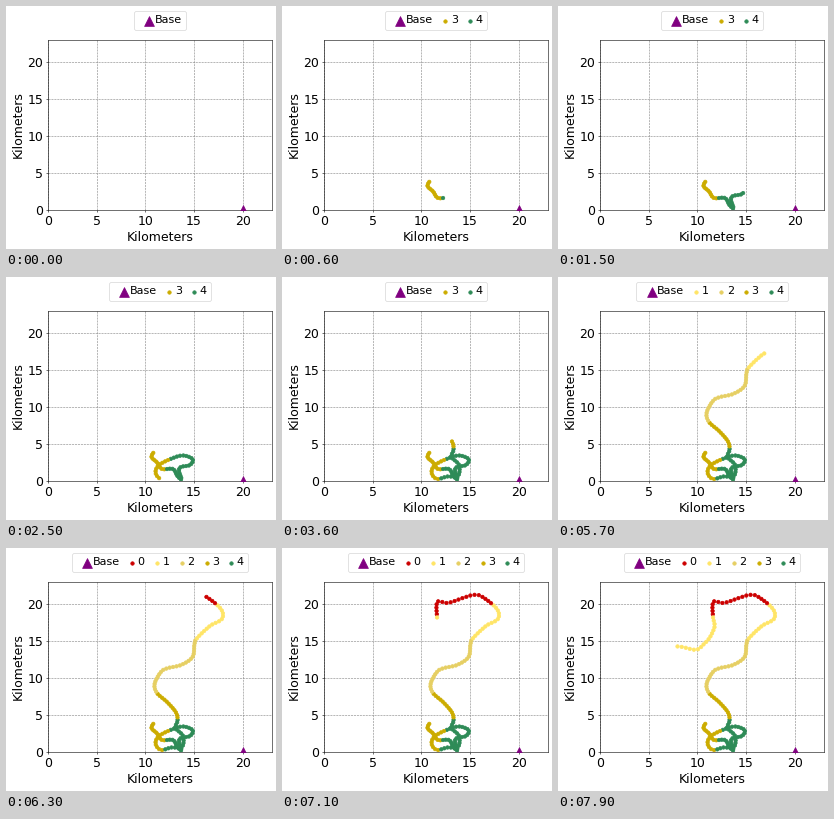
These frames come from a looping animation (270 px wide and 243 px high, 8 s). A matplotlib script:

```python
import matplotlib.pyplot as plt
import numpy as np
from matplotlib.animation import FuncAnimation
from matplotlib.colors import to_rgba_array

W, H, DPI = 270, 243, 50
FRAMES, INTERVAL = 80, 100
DOTS = 2  # new dots per step
BASE = (20, 0)
ZONE = 4  # ring width in km around the base
COLORS = ["#cc0000", "#ffe566", "#e6cf63", "#ccac00", "seagreen"]

# Route legs as knots in km; speed is constant within a leg
START = (10.93, 4.05)
LEGS = [
    [(10.63, 3.24), (11.2, 2.5), (11.7, 1.62), (12.83, 1.62), (13.29, .67)],
    [(13.72, .2), (13.45, 1.35), (13.65, 1.89), (14.58, 2.16), (14.85, 2.95), (13.9, 3.44)],
    [(12.83, 3.1), (11.4, 2.16), (11.05, 1.1), (11.6, .27), (12.68, .61)],
    [(13.75, .65), (13.86, 2.16), (13.09, 3.24), (13.3, 4.2), (13.14, 5.33)],
    [(12.22, 6.75), (11.19, 7.96), (10.95, 9.2), (11.6, 10.8)],
    [(12.3, 11.32), (13.66, 11.74), (14.84, 12.82), (15.04, 14.57), (15.3, 15.35)],
    [(16.63, 17), (17.86, 17.95), (17.75, 19.3), (16.27, 20.92)],
    [(15.4, 21.2), (14.27, 20.78), (12.73, 20.11), (11.65, 20.25), (11.6, 18.29), (11.76, 17.27)],
    [(11.7, 16.6), (11.25, 15.4), (10.7, 14.6), (9.9, 13.8), (8.52, 14.15), (7.96, 14.24)],
]
LEG_STEPS = 9


def smooth(knots, n=20):
    """Cubic Hermite curve through all knots, n samples per span."""
    tangents = np.gradient(knots, axis=0)
    t = np.linspace(0, 1, n, endpoint=False)[:, None]
    spans = [
        (2 * t**3 - 3 * t**2 + 1) * p + (t**3 - 2 * t**2 + t) * u
        + (3 * t**2 - 2 * t**3) * q + (t**3 - t**2) * v
        for p, q, u, v in zip(knots, knots[1:], tangents, tangents[1:])
    ]
    return np.vstack(spans + [knots[-1:]])


def walk(curve, count):
    """Evenly spaced points along a curve, leaving out its start."""
    dist = np.r_[0, np.cumsum(np.hypot(*np.diff(curve, axis=0).T))]
    s = np.linspace(0, dist[-1], count + 1)[1:]
    return np.column_stack([np.interp(s, dist, axis) for axis in curve.T])


def build_route(n=20):
    curve = smooth(np.array([START] + sum(LEGS, [])), n)
    parts, first = [], 0
    for i, leg in enumerate(LEGS):
        steps = min(LEG_STEPS, FRAMES - 1 - i * LEG_STEPS)
        last = first + len(leg) * n
        parts.append(walk(curve[first:last + 1], steps * DOTS))
        first = last
    return np.vstack(parts)


route = build_route()
zones = np.maximum(0, 5 - np.hypot(*(route - BASE).T) // ZONE).astype(int)
dot_colors = to_rgba_array(COLORS)[zones]

plt.rcParams.update({"font.family": "DejaVu Sans", "font.size": 18})
fig = plt.figure(figsize=(W / DPI, H / DPI), dpi=DPI)
ax = fig.add_axes([42 / W, 39 / H, 224 / W, 170.5 / H])
ax.set(xlim=(0, 23), ylim=(0, 23), xlabel="Kilometers", ylabel="Kilometers",
       xticks=range(0, 21, 5), yticks=range(0, 21, 5))
ax.grid(color="gray", linestyle="--", linewidth=0.8)
ax.set_axisbelow(True)

base = ax.scatter(*BASE, s=200, marker="^", color="purple", label="Base", zorder=3)
dots = ax.scatter([], [], s=25, zorder=3)
keys = [ax.scatter([], [], s=25, color=c, label=str(i)) for i, c in enumerate(COLORS)]


def draw(step):
    n = step * DOTS
    dots.set_offsets(route[:n])
    dots.set_facecolor(dot_colors[:n])
    dots.set_edgecolor(dot_colors[:n])
    handles = [base] + [keys[z] for z in np.unique(zones[:n])]
    ax.legend(handles=handles, ncol=len(handles), fontsize=16,
              loc="upper center", bbox_to_anchor=(154 / W, 1 - 5 / H),
              bbox_transform=fig.transFigure, borderaxespad=0,
              handletextpad=-0.5, columnspacing=0.1)
    return [dots]


anim = FuncAnimation(fig, draw, frames=FRAMES, interval=INTERVAL,
                     init_func=lambda: draw(0), repeat=True, repeat_delay=0)
plt.show()
```
